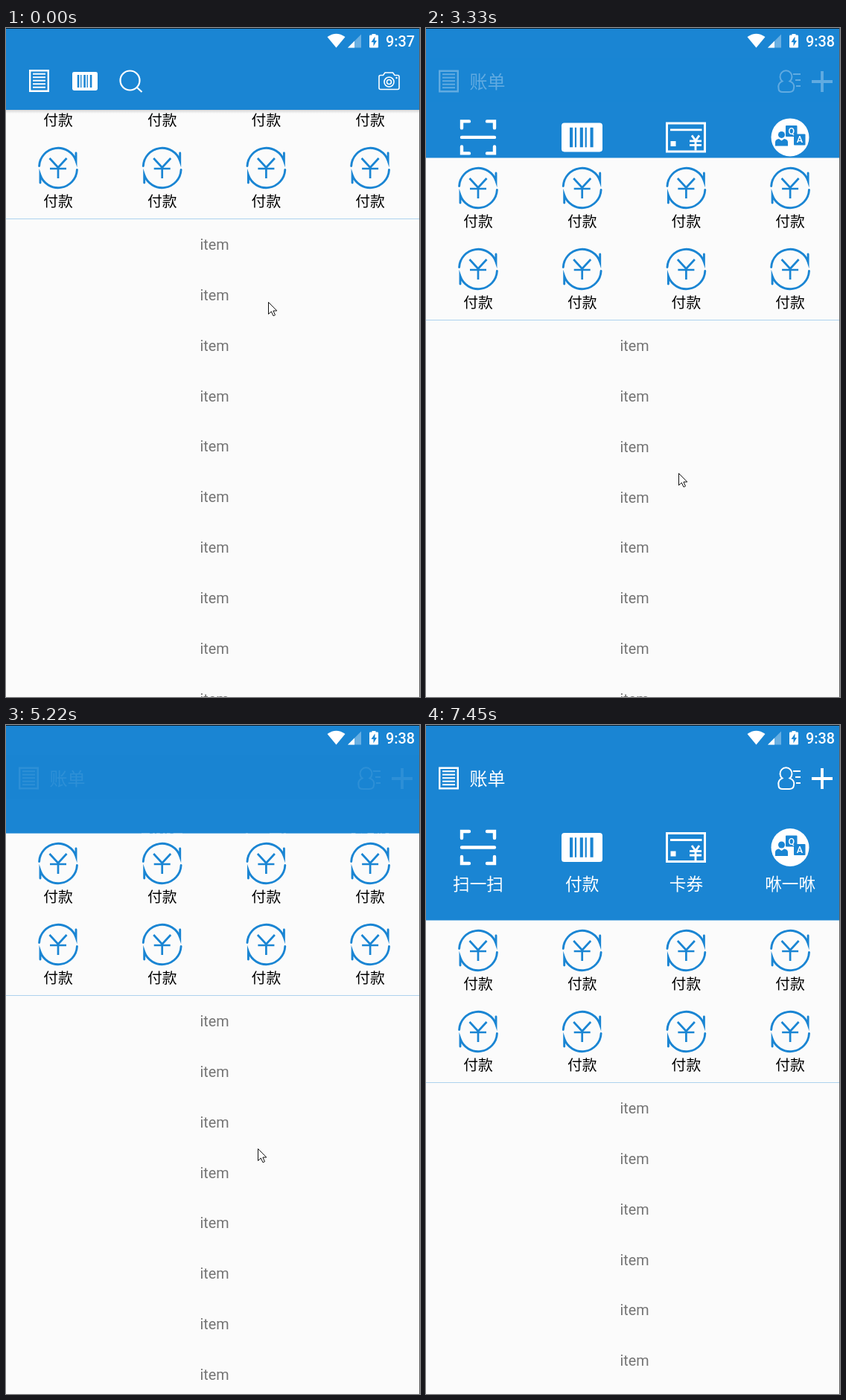
Animation of 556x899 px, one loop 7.87 s. Source, as an HTML page with a canvas:

```html
<!DOCTYPE html>
<html lang="zh-CN">
<head>
<meta charset="utf-8">
<style>
html, body { margin: 0; width: 100%; height: 100%; overflow: hidden; background: #fbfbfb; }
canvas { display: block; }
</style>
</head>
<body>
<canvas id="stage" width="556" height="899"></canvas>
<script>
const c = document.getElementById('stage').getContext('2d');
const W = 556, H = 899, LOOP = 7870;
const BLUE = '#1a85d3', WHITE = '#fff';
const BAR_BOTTOM = 110, HEADER = 262.6, FADE = 128;
const CJK = '"Noto Sans CJK SC", "Noto Sans CJK", sans-serif';
const ROBOTO = 'Roboto, sans-serif';
const column = i => 70 + i * 139.7;

// The screen refreshes every STEP ms, counted anew from each start
const STEP = 142, STARTS = [0, 150, 1280, 2370, 3330, 4480, 5220, 6350, 6930];

// Pointer: time, x, y
const PATH = [
  [0, 352, 368], [1960, 360, 700], [2240, 360, 700], [2370, 359, 696], [3330, 339, 598],
  [4480, 336, 477], [5220, 338, 569], [6350, 344, 716], [6930, 346, 752], [7350, 352, 920]
];

const clamp = (v, lo, hi) => Math.min(hi, Math.max(lo, v));
const ramp = (t, from, to) => clamp((t - from) / (to - from), 0, 1);

function snap(t) {
  const from = STARTS.filter(s => s <= t).pop();
  return from + Math.floor((t - from) / STEP) * STEP;
}

function pointerAt(t) {
  const i = PATH.findIndex(p => p[0] > t);
  if (i < 0) return [0, H + 20];
  const a = PATH[i - 1], b = PATH[i], f = ramp(t, a[0], b[0]);
  return [a[1] + (b[1] - a[1]) * f, a[2] + (b[2] - a[2]) * f];
}

// The list follows the pointer from where each drag took hold
const scrollAt = (t, y) => Math.round(Math.max(0, (t < 2000 ? 592 : 686) - y));
const rowAlpha = t => ramp(t, 1200, 1840) - ramp(t, 3330, 3900) + ramp(t, 6040, 6650);

function text(str, x, y, size, color, font = CJK, align = 'center', weight = 400) {
  c.font = `${weight} ${size}px ${font}`;
  c.textAlign = align;
  c.fillStyle = color;
  c.fillText(str, x, y);
}

function box(x, y, w, h, color, r = 0) {
  c.fillStyle = color;
  c.beginPath();
  c.roundRect(x, y, w, h, r);
  c.fill();
}

function disc(x, y, r, color) {
  c.fillStyle = color;
  c.beginPath();
  c.arc(x, y, r, 0, 7);
  c.fill();
}

function ring(x, y, r, width) {
  c.strokeStyle = WHITE;
  c.lineWidth = width;
  c.beginPath();
  c.arc(x, y, r, 0, 7);
  c.stroke();
}

function stroke(d, width, color = WHITE, cap = 'butt') {
  c.strokeStyle = color;
  c.lineWidth = width;
  c.lineCap = cap;
  c.stroke(new Path2D(d));
}

function fill(d, color) {
  c.fillStyle = color;
  c.fill(new Path2D(d));
}

function at(x, y, draw) {
  c.save();
  c.translate(x, y);
  draw();
  c.restore();
}

function clip(y, h, draw) {
  c.save();
  c.beginPath();
  c.rect(0, y, W, h);
  c.clip();
  draw();
  c.restore();
}

function veil(y, h, alpha) {
  c.globalAlpha = alpha;
  box(0, y, W, h, BLUE);
  c.globalAlpha = 1;
}

function billIcon() {
  stroke('M1.2 1.2H25.8V28.8H1.2Z', 2.4);
  for (let i = 0; i < 5; i++) box(5, 4.7 + i * 4.5, 17, 2, WHITE);
}

function barcodeIcon(w, h) {
  box(0, 0, w, h, WHITE, w * .07);
  for (let i = 0; i < 5; i++)
    box((.2 + i * .125) * w, h * .16, (i % 2 ? .04 : .075) * w, h * .68, BLUE);
}

function statusBar(time) {
  fill('M443.5 26.5L431.5 12Q443.5 3.5 455.5 12Z', WHITE);
  fill('M459 26.5L477 8.5V26.5Z', 'rgba(255,255,255,.35)');
  fill('M459 26.5L468 17.5V26.5Z', WHITE);
  box(488, 9.5, 12, 17, WHITE, 1.2);
  box(491.5, 8, 5, 3, WHITE);
  fill('M495.5 11.5L490.5 19H493.5V24.5L498 17H495.5Z', BLUE);
  text(time, 510, 25, 19.8, WHITE, ROBOTO, 'left', 500);
}

function openBar() {
  at(17, 56.5, billIcon);
  text('账单', 58.5, 81, 24, WHITE, CJK, 'left');
  stroke('M478.5 71.5A8 8 0 1 1 488.5 71.5C493 73 495 77 494 81Q493.5 86 488 86H479'
    + 'Q473.5 86 473.5 81C472.5 77 474.5 73 478.5 71.5Z', 2);
  stroke('M493 62H503M496 70H503M497 78H503', 1.8);
  stroke('M518 72H546M532 58V86', 3.8);
}

function closedBar() {
  at(31, 56, billIcon);
  at(89, 59, () => barcodeIcon(34, 25));
  ring(166.5, 70.5, 13, 2.2);
  stroke('M176 80L182.5 86', 2.2);
  stroke('M503 63.5H506.5L509 60H519.5L522 63.5H526Q528 63.5 528 65.5V80.5Q528 82.5 526 82.5'
    + 'H503Q501 82.5 501 80.5V65.5Q501 63.5 503 63.5Z', 1.6);
  ring(514.5, 72.5, 6.5, 1.6);
  ring(514.5, 72.5, 3, 1.6);
  disc(524.5, 67, 1.2, WHITE);
}

function shortcuts() {
  stroke('M48 152V143H58M82 143H92V152M92 177V186H82M58 186H48V177M48 164.5H92', 4.4, WHITE, 'round');
  at(182, 145, () => barcodeIcon(55, 39));
  stroke('M323.5 145.5H374.5V183.5H323.5Z', 3);
  stroke('M328 154.5H370.5', 2.8);
  box(328.5, 169.5, 7, 7, WHITE);
  stroke('M357 162L362 169L367 162M354 169.5H370M354 175H370M362 169V182', 2.8);
  disc(489, 164.5, 25.5, WHITE);
  disc(477.5, 161, 4.5, BLUE);
  fill('M469 176V171Q469 167 474 166.5L477.5 169L481 166.5Q486 167 486 171V176Z', BLUE);
  box(483, 148.5, 15.5, 15, BLUE, 1);
  box(494, 160, 15.5, 15, BLUE, 1);
  text('Q', 490.8, 160.5, 12.5, WHITE, ROBOTO, 'center', 500);
  text('A', 501.8, 172, 12.5, WHITE, ROBOTO, 'center', 500);
  ['扫一扫', '付款', '卡券', '咻一咻'].forEach((s, i) => text(s, column(i), 221.5, 22.6, WHITE));
}

function payIcon() {
  const half = 'M-25.4 -2.5A25.4 25.4 0 0 1 24 -9.5V-20';
  stroke(half, 2.9, BLUE, 'round');
  c.save();
  c.rotate(Math.PI);
  stroke(half, 2.9, BLUE, 'round');
  c.restore();
  stroke('M-11.5 -13L0 -.5L11.5 -13M0 -.5V14M-11 1H11', 2.7, BLUE);
}

function content(scroll) {
  for (let i = 0; i < 8; i++) {
    const x = column(i % 4), y = 303 + (i > 3) * 109 - scroll;
    at(x, y, payIcon);
    text('付款', x, y + 51.5, 19.8, '#000');
  }
  veil(480 - scroll, 1, .35);
  for (let i = 0; i < 10; i++)
    text('item', 280, 522 + i * 67.85 - scroll, 19.8, '#757575', ROBOTO);
}

function shadow(y) {
  const g = c.createLinearGradient(0, y, 0, y + 5);
  g.addColorStop(0, 'rgba(0,0,0,.15)');
  g.addColorStop(1, 'rgba(0,0,0,0)');
  c.fillStyle = g;
  c.fillRect(0, y, W, 5);
}

function header(scroll, row) {
  const bottom = Math.max(BAR_BOTTOM, HEADER - scroll);
  if (bottom === BAR_BOTTOM) shadow(bottom);
  veil(0, bottom, 1);
  clip(0, bottom, () => {
    at(0, -.2 * scroll, shortcuts);
    veil(0, bottom, 1 - row);
  });
  if (scroll >= FADE) return closedBar();
  clip(40, 60, () => {
    openBar();
    veil(40, 60, scroll / FADE);
  });
}

function pointer(x, y) {
  const d = 'M.5 .5V16.5L4.3 13L7 18.8L9.5 17.7L6.9 12H11.8Z';
  at(Math.round(x), Math.round(y), () => {
    fill(d, WHITE);
    stroke(d, 1, '#111');
  });
}

function draw(now) {
  const t = snap(now % LOOP);
  const [x, y] = pointerAt(t);
  const scroll = scrollAt(t, y);
  box(0, 0, W, H, '#fbfbfb');
  content(scroll);
  header(scroll, rowAlpha(t));
  statusBar(t < 2780 ? '9:37' : '9:38');
  box(0, 0, W, 1, '#0c1a26');
  box(555, 0, 1, H, '#606060');
  pointer(x, y);
}

const start = performance.now();
function tick() {
  draw(performance.now() - start);
  requestAnimationFrame(tick);
}
tick();
</script>
</body>
</html>
```
